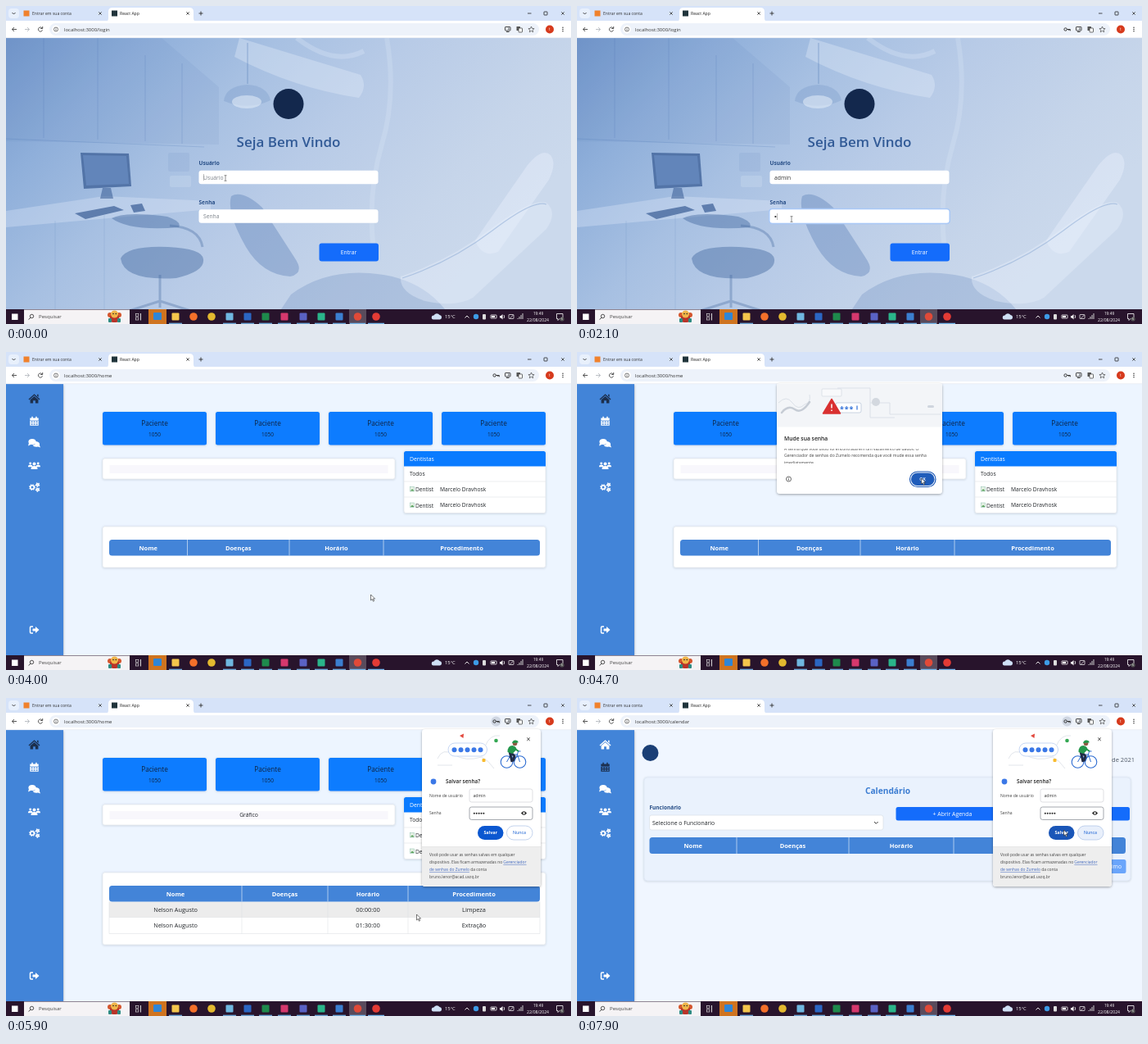
These frames come from a looping animation (690 px wide and 388 px high, 8 s). An HTML page:

```html
<!DOCTYPE html>
<html lang="pt-BR">
<head>
<meta charset="utf-8">
<title>Login e calendário</title>
<style>
html, body { margin: 0; width: 100%; height: 100%; overflow: hidden; }
svg { display: block; font-family: "Open Sans", "Noto Sans", sans-serif; }
</style>
</head>
<body>
<svg id="stage" width="690" height="388" viewBox="0 0 690 388"></svg>
<script>
// Drawing helpers; text is placed by the middle of its capitals
const text = (x, y, s, size, fill = '#212529', more = '') =>
  `<text x="${x}" y="${y + size * .36}" font-size="${size}" fill="${fill}" ${more}>${s}</text>`;
const mid = (x, y, s, size, fill, weight = 400) =>
  text(x, y, s, size, fill, `text-anchor="middle" font-weight="${weight}"`);
const bold = (x, y, s, size, fill, weight = 700) => text(x, y, s, size, fill, `font-weight="${weight}"`);
const rect = (x, y, w, h, fill, rx = 0, more = '') =>
  `<rect x="${x}" y="${y}" width="${w}" height="${h}" rx="${rx}" fill="${fill}" ${more}/>`;
const dot = (x, y, r, fill, more = '') => `<circle cx="${x}" cy="${y}" r="${r}" fill="${fill}" ${more}/>`;
const line = (d, stroke = '#333', w = 1, more = '') =>
  `<path d="${d}" fill="none" stroke="${stroke}" stroke-width="${w}" ${more}/>`;
const shape = (d, fill, more = '') => `<path d="${d}" fill="${fill}" ${more}/>`;
const group = (id, ...parts) => `<g id="${id}">${parts.join('')}</g>`;
const edge = (color, w = .6) => `stroke="${color}" stroke-width="${w}"`;
const repeat = (n, draw) => Array.from({ length: n }, (_, i) => draw(i)).join('');

const BLUE = '#146cfb', SIDE = '#4384d8', CARD = '#0a7bff', INK = '#10233f';
const PATIENT = 'Nelson Augusto', DENTIST = 'Marcelo Dravhosk';
const BRAND = 'Zumelo', MAIL = 'bruno.lenor@acad.uvzq.br';

const defs = `<defs>
  <linearGradient id="wall" x2="1" y2=".45">
    <stop stop-color="#7397cb"/><stop offset=".2" stop-color="#8fafda"/><stop offset=".4" stop-color="#a7c0e2"/>
    <stop offset=".6" stop-color="#b8cbe7"/><stop offset=".85" stop-color="#c6d5ea"/><stop offset="1" stop-color="#cbd9ec"/>
  </linearGradient>
  <filter id="shadow" x="-20%" y="-20%" width="140%" height="140%">
    <feDropShadow dx="0" dy="1" stdDeviation="1.6" flood-opacity=".35"/></filter>
  <filter id="soft"><feDropShadow dx="0" dy=".5" stdDeviation="1" flood-color="#345" flood-opacity=".25"/></filter>
  <clipPath id="note"><rect x="244" y="118" width="202" height="18"/></clipPath>
  <clipPath id="page"><rect y="39" width="690" height="331"/></clipPath>
</defs>`;

function browser() {
  const cross = (x, y, r = 1.7) =>
    line(`M${x - r} ${y - r}l${2 * r} ${2 * r}m0 ${-2 * r}l${-2 * r} ${2 * r}`, '#333', .8);
  return rect(0, 0, 690, 19, '#d6e3f9') + rect(0, 18, 690, 21, '#fff') +
    rect(3, 3, 13, 12, '#e8f0fc', 4) + line('M7.5 8l2 2 2-2', '#333', .9) +
    rect(21.5, 5.5, 7, 7, '#f0812c') + text(32, 9, 'Entrar em sua conta', 5.1, '#333') + cross(115, 9) +
    shape('M121 19q4 0 4-4V7q0-5 5-5h94q5 0 5 5v8q0 4 4 4z', '#fff') +
    rect(129, 5.5, 7, 7, '#20343b') + text(139, 9, 'React App', 5.1, '#222') + cross(222, 9) +
    line('M235.500 9h5m-2.500-2.500v5', '#333', .9) +
    line('M637 9h4.500', '#222', .8) + rect(657, 7, 4, 4, 'none', .5, edge('#222', .8)) + cross(680, 9) +
    line('M13 28.500H7.500m2.500-2.500l-2.500 2.500 2.500 2.500', '#444', .9) +
    line('M23 28.500h5.500m-2.500-2.500l2.500 2.500-2.500 2.500', '#b5b9bf', .9) +
    line('M44.300 27.300a2.600 2.600 0 1 0 .2 2M44.700 25v2.500h-2.500', '#444', .9) +
    rect(53, 21, 598, 15, '#edf2fa', 7.5) + dot(61, 28.5, 5, '#fff') +
    dot(61, 28.5, 2.5, 'none', edge('#444', .7)) + line('M61 28v1.800m0-3v.6', '#444', .7) +
    text(71, 28.5, '', 5.95, '#333', 'id="url"') +
    group('key', dot(598.5, 28.5, 6, '#cfd6e2', 'id="keyGlow"'),
      dot(596.6, 28.5, 1.7, 'none', edge('#333', 1)) + line('M598.300 28.500h4v1.800m-1.500-1.800v1.500', '#333', 1)) +
    rect(609.5, 25.5, 6.5, 4.5, 'none', .6, edge('#333', .9)) + line('M611 31.500h3.500m-.5-5v2.500', '#333', .9) +
    rect(623.5, 25, 4.5, 5, '#555', .6) + rect(626, 27, 4.5, 5, '#fff', .6, edge('#444', .8)) +
    shape('M641.500 25l1 2.400 2.600.2-2 1.700.6 2.500-2.200-1.400-2.200 1.400.6-2.500-2-1.700 2.600-.2z', 'none', edge('#444', .7)) +
    dot(664, 28.5, 5, '#d63a1c') + text(663, 28.5, 't', 4.5, '#fff') +
    repeat(3, i => dot(680, 26.2 + i * 2.3, .75, '#333')) + line('M0 38.700H690', '#dfe5ee', .6);
}

function taskbar() {
  const apps = [[207, '#f4c64c', 1], [229, '#f4702a'], [251, '#e3b92f'], [273, '#6fb7e0', 1], [295, '#2b66c3', 1],
    [317, '#1e8a4c', 1], [340, '#d5386d', 1], [363, '#5a62c4', 1], [385, '#2ab58a', 1], [407, '#3b7ed0', 1]];
  return rect(0, 370, 690, 18, '#28142c') + rect(7, 375.5, 7.5, 7.5, '#fff') +
    rect(22, 370.5, 129, 17.5, '#f5f3f5') + dot(31.5, 378.5, 2.2, 'none', edge('#222', .8)) +
    line('M30 380.200l-2.300 2.300', '#222', .9) + text(40, 379, 'Pesquisar', 6.1, '#444') +
    dot(127, 377, 3, '#d4562e') + dot(138, 377, 3, '#d4562e') + rect(127, 376, 11, 10, '#b8342a', 4) +
    dot(132.5, 376, 4.5, '#f0b64a') + dot(131, 375.5, .8, '#222') + dot(134.300, 375.5, .8, '#222') +
    rect(125, 381, 4, 5, '#2d8c83', 1) + rect(136, 381, 4, 5, '#2d8c83', 1) +
    rect(158.5, 375.5, 3.4, 3, 'none', 0, edge('#eee')) + rect(158.5, 380, 3.4, 3, 'none', 0, edge('#eee')) +
    line('M164.500 375v8.500', '#eee', .9) +
    rect(174, 370, 22, 18, '#cf7420') + rect(180, 374, 10, 9, '#2f86d6', 1) +
    rect(419, 370, 21, 18, '#594b5c') + dot(429.5, 379, 4.8, '#e04a38') +
    dot(452, 379, 4.8, '#e33b35') + line('M420 387.300h19m3 0h20', '#76b9ed', 1.2) +
    apps.map(([x, color, box]) => (box ? rect(x - 4.5, 374.5, 9, 9, color, 1) + line(`M${x - 8} 387.300h16`, '#76b9ed', 1.2)
      : dot(x, 379, 4.8, color))).join('') +
    shape('M522 382.500a2.500 2.500 0 0 1 .5-5 4 4 0 0 1 7-.5 2.800 2.800 0 0 1 .5 5.500z', '#cfe0f5') +
    text(536, 379, '15°C', 5.8, '#fff') + line('M560.500 380.500l2.500-2.500 2.500 2.500', '#fff', .9) +
    dot(574, 379, 3.2, '#3d9be6') + rect(582, 376, 4, 6.5, '#ddd', 1) +
    rect(592, 377, 7, 4, 'none', .5, edge('#fff', .8)) + rect(593, 378, 4, 2, '#fff') +
    shape('M603 378h1.500l2-2v6.500l-2-2H603z', '#fff') + line('M608 377q1.500 2 0 4', '#fff', .8) +
    rect(614, 376.5, 6, 5, 'none', .5, edge('#fff', .7)) + line('M615.500 381l4-4', '#fff', .7) +
    line('M625 382v-1m2 1v-3m2 3v-5m2 5v-7', '#ccc', 1) +
    mid(650, 374.8, '19:49', 4.8, '#fff') + mid(649.5, 383, '22/08/2024', 5.1, '#fff') +
    shape('M672.500 375.500h7.500v6h-4l-2 2v-2h-1.500z', 'none', edge('#fff', .8)) + dot(679, 382, 2.6, '#555') +
    mid(679, 382, '5', 4, '#fff');
}

function clinic() {
  const deep = '#3d6ba9', pale = '#e6eefa';
  return rect(0, 39, 690, 331, 'url(#wall)') + `<g clip-path="url(#page)">` +
    shape('M0 39h190l70 60v70L0 165z', deep, 'opacity=".08"') +
    line('M46 39v122M112 39v124M170 60v105M215 70v98M0 162l242 10', deep, 1, 'opacity=".2"') +
    shape('M0 250l120-18 130 6v10L0 270z', pale, 'opacity=".3"') + line('M60 262v108M120 255v115', deep, 1, 'opacity=".12"') +
    shape('M285 39l148 45q9 14-2 28-80-12-152-50z', pale, 'opacity=".35"') + line('M355 39q45 35 82 16', pale, 6, 'opacity=".25"') +
    line('M465 39q12 70-6 130t-10 130', pale, 6, 'opacity=".2"') +
    line('M295 45v50', deep, 2, 'opacity=".2"') +
    shape('M266 116q2-18 28-20 25 1 29 19-26 13-57 1z', deep, 'opacity=".16"') +
    `<ellipse cx="294" cy="117" rx="18" ry="8" fill="${pale}" opacity=".55"/>` +
    rect(198, 179, 26, 23, deep, 2, 'opacity=".08"') + rect(200, 207, 26, 14, pale, 2, 'opacity=".2"') +
    shape('M91 179l59 1 3 40-58 3z', '#40639a', 'opacity=".8"') + shape('M94 182l53 1 3 34-52 2z', '#6488bd', 'opacity=".9"') +
    shape('M118 222h10l3 13h-16z', '#40639a', 'opacity=".6"') +
    shape('M84 253l48-9 12 5-47 11zM152 243l14-2 4 9-14 2z', '#40639a', 'opacity=".75"') +
    `<g fill="#44699f" opacity=".45">${shape('M129 259q18-9 68-2 18 6 14 13-60 5-82-11zM140 308q8-16 58-14 42 2 43 15 2 15-33 23-64 4-68-24z')}</g>` +
    line('M200 268q36 2 40 26M188 328v40m0-8l-38 12m38-12l38 12', '#44699f', 3, 'opacity=".35"') +
    shape('M275 232q14-8 38 14l40 62q12 18-6 22-34-2-54-36-24-42-18-62z', '#456fac', 'opacity=".32"') +
    shape('M348 352q40-30 96-26 60 4 92 44H336z', '#456fac', 'opacity=".22"') +
    shape('M573 286l64-92q18-22 28-12 8 10-2 30l-62 88q-20 8-28-14z', pale, 'opacity=".45"') +
    shape('M482 330q60-20 110-58t68-32q14 12 0 32l-90 84q-20 12-58 4-32-10-30-30z', pale, 'opacity=".4"') +
    line('M484 332q60-20 110-58t66-32', '#86a5d2', 1.2, 'opacity=".5"') + '</g>';
}

function login() {
  const field = (y, id) => group(id, rect(234.7, y - .8, 220.6, 18.1, '#9cc2fb', 3.6, edge('#a9c8f6', 1.4))) +
    rect(235.5, y, 219, 16.5, '#fff', 3);
  return clinic() + dot(345, 119.5, 18.5, '#13284d') +
    mid(345, 165.5, 'Seja Bem Vindo', 17, '#315a96', 600) +
    bold(235.5, 192, 'Usuário', 6.5, '#264d86') + field(200.7, 'ringUser') +
    bold(235.5, 239.5, 'Senha', 6.5, '#264d86') + field(248.3, 'ringPass') +
    text(241, 209.3, '', 6.75, '', 'id="user"') + text(241, 257, 'Senha', 6.7, '#7b8189', 'id="passHint"') +
    repeat(5, i => dot(242.4 + 3 * i, 257, 1.1, '#222', `class="mark"`)) +
    rect(0, 0, .5, 8, '#777', 0, 'id="caret"') +
    rect(382.5, 289.6, 72.5, 22, BLUE, 3, 'id="enter"') + mid(418.5, 301, 'Entrar', 6.8, '#fff');
}

function sidebar() {
  const ico = (id, draw) => `<g id="${id}" fill="#fff" stroke="none">${draw}</g>`;
  const person = (x, y, r) => dot(x, y, r, '') + shape(`M${x - 2 * r} ${y + r * 3.2}q0-${r * 2} ${2 * r}-${r * 2}t${2 * r} ${r * 2}z`, '');
  const plain = s => s.replaceAll('fill=""', '');
  const gear = (x, y, r) => dot(x, y, r, 'none', edge('#fff', 1.6)) +
    dot(x, y, r + 1, 'none', 'stroke="#fff" stroke-width="1.200" stroke-dasharray="1.300 1.300"');
  return rect(0, 39, 70, 331, SIDE, 0, 'filter="url(#shadow)"') +
    ico('icoHome', plain(shape('M27.500 57.500l7-6.300 7 6.300-.9 1-6.100-5.400-6.100 5.400zM29.600 58.200l4.900-4.300 4.900 4.300v4.300h-3.500v-3.300h-2.800v3.300h-3.500z', '') + '<path d="M38 51.800h1.600v3.200L38 53.500z"/>')) +
    ico('icoCal', '<path d="M29.300 80.500h2v-1.700h1.500v1.700h3.400v-1.700h1.500v1.700h2v2.400H29.300z"/><path fill-rule="evenodd" d="M29.300 83.600h10.400v6.200H29.300zm1.400 1v1.400h1.800v-1.400zm3 0v1.400h1.800v-1.400zm3 0v1.400h1.800v-1.400zm-6 2.700v1.400h1.800v-1.400zm3 0v1.400h1.800v-1.400zm3 0v1.400h1.800v-1.400z"/>') +
    ico('icoChat', `<path d="M36 109q6 .5 5 5l1 2.500-3-1q-5 1-6.500-2 4 0 3.500-4.500z"/><ellipse cx="32" cy="109.500" rx="4.600" ry="3.500"/><path d="M28 111l-1 3.500 4-2z"/>`) +
    ico('icoUsers', plain(person(29.7, 135.8, 1.4) + person(39.2, 135.8, 1.4) + person(34.5, 136.5, 2))) +
    gear(32, 165, 2.3) + gear(38.5, 162, 1.2) + gear(38.5, 168, 1.2) +
    line('M33 335h-2.500q-1 0-1 1v6q0 1 1 1h2.500', '#fff', 1.5) + shape('M32.500 337.500h3.500V335l4.500 4-4.500 4v-2.500h-3.500z', '#fff');
}

function tableHead(y, h, stops, labels) {
  const x = stops[0], w = stops.at(-1) - x;
  return rect(x, y, w, h, SIDE, 3.5) + labels.map((s, i) =>
    mid((stops[i] + stops[i + 1]) / 2, y + h / 2 + .2, s, 7.5, '#fff', 700) +
    (i ? line(`M${stops[i]} ${y}v${h}`, '#dbe8fa', .7) : '')).join('');
}
const COLUMNS = ['Nome', 'Doenças', 'Horário', 'Procedimento'];

function home() {
  const panel = (x, y, w, h) => rect(x, y, w, h, '#fff', 2.5, edge('#dde3ea') + ' filter="url(#soft)"');
  const stops = [126, 288, 393, 491, 652];
  const row = (y, fill, time, job) => rect(126, y, 526, 19.5, fill) + line(`M126 ${y + 19.500}h526`, '#dfe2e6', .6) +
    stops.map(x => line(`M${x} ${y}v19.500`, '#dfe2e6', .6)).join('') +
    mid(207, y + 9.5, PATIENT, 7.3) + mid(442, y + 9.5, time, 7.5) + mid(571.5, y + 9.5, job, 7.4);
  const dentist = y => rect(493.5, y - 3, 5, 5.5, '#e8f2e5', 0, edge('#8ba', .5)) + shape(`M494 ${y + 2}l2-2.500 2.500 2.500z`, '#57a05a') +
    text(500, y + .5, 'Dentist', 6.6) + text(530, y - .3, DENTIST, 6.7);
  return rect(0, 39, 690, 331, '#edf5ff') +
    repeat(4, i => rect(118 + 138 * i, 73, 127, 40.5, CARD, 2.5, 'filter="url(#soft)"') +
      mid(181.500 + 138 * i, 87, 'Paciente', 8.2, INK, 500) + mid(181.500 + 138 * i, 101, '1050', 6.5, INK)) +
    panel(118, 130, 357, 25) + rect(126.5, 138, 340, 10, '#f8f7fc') + group('chart', mid(296.5, 143, 'Gráfico', 6.8)) +
    panel(486, 121, 173, 75.5) + shape('M486 139.500v-16q0-2.500 2.500-2.500h168q2.500 0 2.500 2.500v16z', CARD) +
    text(493, 130.5, 'Dentistas', 6.8, '#fff') + text(493, 149, 'Todos', 6.7) + dentist(167.5) + dentist(187) +
    line('M486 158h173M486 177h173', '#dfe2e6', .6) +
    group('empty', panel(118, 213, 541, 50), tableHead(229, 19.5, [126, 221.5, 346, 461, 652], COLUMNS)) +
    group('loaded', panel(118, 213, 541, 88), row(248.5, '#ececec', '00:00:00', 'Limpeza'), row(268, '#fff', '01:30:00', 'Extração'),
      tableHead(229, 19.5, stops, COLUMNS));
}

function calendar() {
  return rect(0, 39, 690, 331, '#f0f6ff') + dot(89.5, 67, 10, '#1b3f75') +
    text(681, 75, '23 de agosto de 2021', 7.5, '#4b5563', 'text-anchor="end"') +
    rect(82, 97, 594, 126, '#eaf2fd', 4, edge('#d9e3f1') + ' filter="url(#soft)"') +
    mid(379.5, 113.5, 'Calendário', 10.2, '#3c7dd2', 700) + bold(88.5, 134, 'Funcionário', 6.5, '#264d86') +
    rect(88.5, 143, 285.5, 18, '#fff', 2.5, edge('#d3dae3')) + text(92, 152.5, 'Selecione o Funcionário', 6.9) +
    line('M363 151l2.300 2.300 2.300-2.300', '#333', 1) +
    rect(389.5, 133, 285.5, 16.5, BLUE, 2.5) + mid(458.5, 141.5, '+ Abrir Agenda', 6.9, '#fff') +
    tableHead(170, 20, [88.5, 195, 332, 460, 670], COLUMNS) +
    rect(628, 197, 42.5, 17, '#6aa5fb', 2.5) + text(665, 205.5, 'Próximo', 6.8, '#fff', 'text-anchor="end"');
}

function warning() {
  return rect(244, 38, 202, 135, '#fff', 4, 'filter="url(#shadow)"') + rect(244, 38.5, 202, 53, '#f3f5f8') +
    line('M246 62q10-10 17 0t15 2q8-2 6-12M358 62h24v14h62M318 44h40v36h30', '#d9dee6', .9) +
    line('M250 74q8-10 16-4t18-9', '#c6ccd5', 2.5, 'stroke-linecap="round"') + dot(365, 61, 5, '#d3d8df') +
    rect(299, 45, 24, 9, '#f8f9fb', 1, edge('#cfd5de')) + rect(428, 65, 8, 3, '#cfd5de', 1.5) +
    rect(316, 62, 31, 12, '#fff', 2, edge('#aab9d2')) + text(321, 69.7, '***', 9, '#3070d8', 'font-weight="700" letter-spacing=".800"') +
    line('M342 65.500v5', '#3070d8', 1.2) +
    shape('M311 57.500l10.500 17.500h-21z', '#d93030', edge('#d93030', 1.5) + ' stroke-linejoin="round"') +
    line('M311 63.500v5m0 2v1.500', '#fff', 1.5) +
    bold(253, 105.5, 'Mude sua senha', 6.75, '#222', 600) + '<g clip-path="url(#note)">' +
    text(253, 118, 'A senha que você usou foi encontrada em um vazamento de dados. O', 5.05, '#444') +
    text(253, 126.5, `Gerenciador de senhas do ${BRAND} recomenda que você mude essa senha`, 5.05, '#444') +
    text(253, 135, 'imediatamente.', 5.05, '#444') + '</g>' +
    dot(258.5, 155, 3, 'none', edge('#444', .8)) + line('M258.500 154.500v2.200m0-3.600v.7', '#444', .8) +
    rect(406.5, 146, 31.5, 18.5, '#fff', 9.2, edge('#1b57b5', 1.2)) + rect(408, 147.5, 28.5, 15.5, '#1f5cba', 7.7) +
    mid(422, 155.3, 'OK', 5.3, '#fff', 600);
}

function savePrompt() {
  const wheel = x => dot(x, 78, 7.3, 'none', edge('#2c6bd1', 1.1));
  return rect(508, 38, 145, 192, '#fff', 4, 'filter="url(#shadow)"') +
    shape('M508 181.500h145v44.500q0 4-4 4h-137q-4 0-4-4z', '#eeeeee') + line('M508 181.500h145', '#ddd', .6) +
    line('M527 74q6-14 20-5t34 3q8 4 15 14M527 82h18M585 59q6-15 18-13', '#d5dae2', .7) +
    rect(540, 55, 47.5, 16, '#fff', 8, edge('#b9cdf0', .8)) + repeat(5, i => dot(547.5 + 8 * i, 63.2, 3, '#3b78e7')) +
    shape('M554 46l5-2.500-.5 5.500z', '#e2483d') + dot(598.5, 52, 2.3, '#34a853') + rect(581.5, 74, 4, 4, '#f9bb2d', 1) +
    wheel(611.5) + wheel(627.5) + line('M611.500 78l5-9h8l3 9M617 69l3.500 9 4-9M624.500 69l1-4h3', '#2c6bd1', 1) +
    line('M615 65l6 6-2 6m-4-12l3 13', '#202b45', 3, 'stroke-linejoin="round"') +
    shape('M612.500 66q0-8 6-8 5 1 5 5l-5 5z', '#24974c') + line('M620 61l6 4', '#24974c', 2) + dot(621.5, 55.500, 2.8, '#8d5b43') +
    shape('M618 55q1-4 4.500-3.500t3 3z', '#24974c') +
    line('M636.200 48.500l3.600 3.600m0-3.600l-3.600 3.600', '#333', .9) +
    dot(522, 102, 3.4, '#3b78e7') + bold(537, 102, 'Salvar senha?', 6.4, '#222', 600) +
    text(517, 119, 'Nome de usuário', 5.05, '#444') + rect(566, 111, 77, 16, '#fff', 2.5, edge('#c9ccd1')) + text(570.5, 119, 'admin', 5.1, '#333') +
    text(517, 140.5, 'Senha', 5.05, '#444') + rect(566, 133, 77, 15.5, '#fff', 2.5, edge('#8f949b', .8)) +
    repeat(5, i => dot(571.8 + 2.9 * i, 140.7, 1, '#222')) + shape('M629 140.500q3.500-4.500 7 0-3.500 4.500-7 0z', '#222') + dot(632.5, 140.500, 1.2, '#fff') +
    rect(576, 156, 31.5, 17, '#0b57d0', 8.5, 'id="save"') + mid(591.7, 164.5, 'Salvar', 5.4, '#fff', 700) +
    rect(611.5, 156, 31.5, 17, '#fff', 8.5, 'id="never" ' + edge('#aac0e6', .7)) + mid(627, 164.5, 'Nunca', 5.3, '#0b57d0', 500) +
    text(517, 191.3, 'Você pode usar as senhas salvas em qualquer', 4.9, '#444') +
    text(517, 200.3, 'dispositivo. Elas ficam armazenadas no <tspan fill="#3f66bd" text-decoration="underline">Gerenciador</tspan>', 4.9, '#444') +
    text(517, 209.3, `<tspan fill="#3f66bd" text-decoration="underline">de senhas do ${BRAND}</tspan> da conta`, 4.9, '#444') +
    text(517, 218.3, MAIL, 4.9, '#444');
}

const pointers =
  group('beam', line('M-1.500-3.300h3m-1.500 0v6.600m-1.500 0h3', '#444', .6)) +
  group('arrow', shape('M-1.500-3v7l1.700-1.500 1.200 2.700 1.200-.5-1.200-2.600h2.200z', '#fff', edge('#222'))) +
  group('hand', shape('M-1.500-3.500q.8-.8 1.500 0v3l3 .8q1 .4.800 1.500l-.8 3h-4l-2-3q0-1 1.500-.3z', '#fff', edge('#222')));

const stage = document.getElementById('stage');
stage.innerHTML = defs + group('login', login()) + group('home', home()) + group('calendar', calendar()) +
  group('side', sidebar()) +
  group('status', rect(0, 360.5, 62, 9.5, '#dfe6f1', 1.5), text(2, 365.3, 'localhost:3000/calendar', 4.9, '#555')) +
  browser() + taskbar() + group('warning', warning()) + group('savePrompt', savePrompt()) + group('pointer', pointers);

const el = Object.fromEntries([...stage.querySelectorAll('[id]')].map(e => [e.id, e]));
const marks = stage.querySelectorAll('.mark');
const fade = (id, v) => { el[id].style.opacity = +v; };
const paint = (id, color) => el[id].setAttribute('fill', color);
const ramp = (t, a, b) => Math.min(1, Math.max(0, (t - a) / (b - a)));
const typed = (t, times) => times.filter(at => t >= at).length;

// Pointer stops: time, x, y
const ROUTE = [[0, 268, 210], [1600, 268, 210], [2000, 262, 260], [2900, 262, 260], [3400, 447, 299], [4000, 447, 299],
  [4500, 422, 157], [4900, 422, 157], [5500, 503, 267], [5900, 503, 267], [6200, 34, 92], [7000, 34, 92],
  [7600, 625, 167], [7900, 596, 164], [8000, 596, 164]];

function pointerAt(t) {
  const i = ROUTE.findIndex(stop => stop[0] > t);
  const [a, x, y] = ROUTE[i - 1], [b, x2, y2] = ROUTE[i];
  const k = ramp(t, a, b), e = k * k * (3 - 2 * k);
  return [x + (x2 - x) * e, y + (y2 - y) * e];
}

function render(t) {
  const onLogin = t < 4000, onCalendar = t >= 6400, onHome = !onLogin && !onCalendar;
  fade('login', onLogin); fade('home', onHome); fade('calendar', onCalendar); fade('side', !onLogin);
  el.url.textContent = 'localhost:3000/' + (onCalendar ? 'calendar' : t >= 3800 ? 'home' : 'login');

  const letters = typed(t, [700, 1000, 1100, 1300, 1500]), dots = typed(t, [2100, 2300, 2500, 2700, 2900]);
  el.user.textContent = letters ? 'admin'.slice(0, letters) : 'Usuário';
  paint('user', letters ? '#333' : '#7b8189');
  fade('passHint', !dots);
  marks.forEach((m, i) => { m.style.opacity = +(i < dots); });
  fade('ringUser', ramp(t, 0, 300) * (1 - ramp(t, 1700, 1900)));
  fade('ringPass', ramp(t, 1700, 1900) * (1 - ramp(t, 3300, 3500)));
  const inPass = t >= 1800;
  el.caret.setAttribute('x', inPass ? 241.3 + 3 * dots : 241 + [0, 3.8, 7.9, 14.2, 15.9, 20][letters]);
  el.caret.setAttribute('y', inPass ? 253 : 205);
  fade('caret', t < 3400);

  const [x, y] = pointerAt(t);
  const overEnter = onLogin && x > 383 && y > 290;
  paint('enter', overEnter ? '#0c5bd0' : BLUE);
  const overSide = !onLogin && x < 70;
  const kind = overEnter || overSide ? 'hand' : onLogin ? 'beam' : 'arrow';
  for (const id of ['beam', 'arrow', 'hand']) fade(id, id === kind);
  el.pointer.setAttribute('transform', `translate(${x} ${y})`);
  fade('status', overSide);
  paint('icoHome', onHome ? '#1c2f4d' : '#fff');
  paint('icoCal', onCalendar || overSide ? '#1c2f4d' : '#fff');

  const loaded = t >= 4900, prompt = ramp(t, 5000, 5200);
  fade('chart', loaded); fade('loaded', loaded); fade('empty', !loaded);
  fade('warning', ramp(t, 4100, 4400) * (1 - ramp(t, 4700, 4900)));
  fade('savePrompt', prompt);
  fade('key', t >= 1500); fade('keyGlow', prompt);
  paint('never', t >= 7500 ? '#e8effb' : '#fff');
  paint('save', t >= 7800 ? '#1a56b8' : '#0b57d0');
}

// The screen updates ten times a second
function tick(now) {
  render(Math.floor(now / 100) * 100 % 8000);
  requestAnimationFrame(tick);
}
requestAnimationFrame(tick);
</script>
</body>
</html>
```
